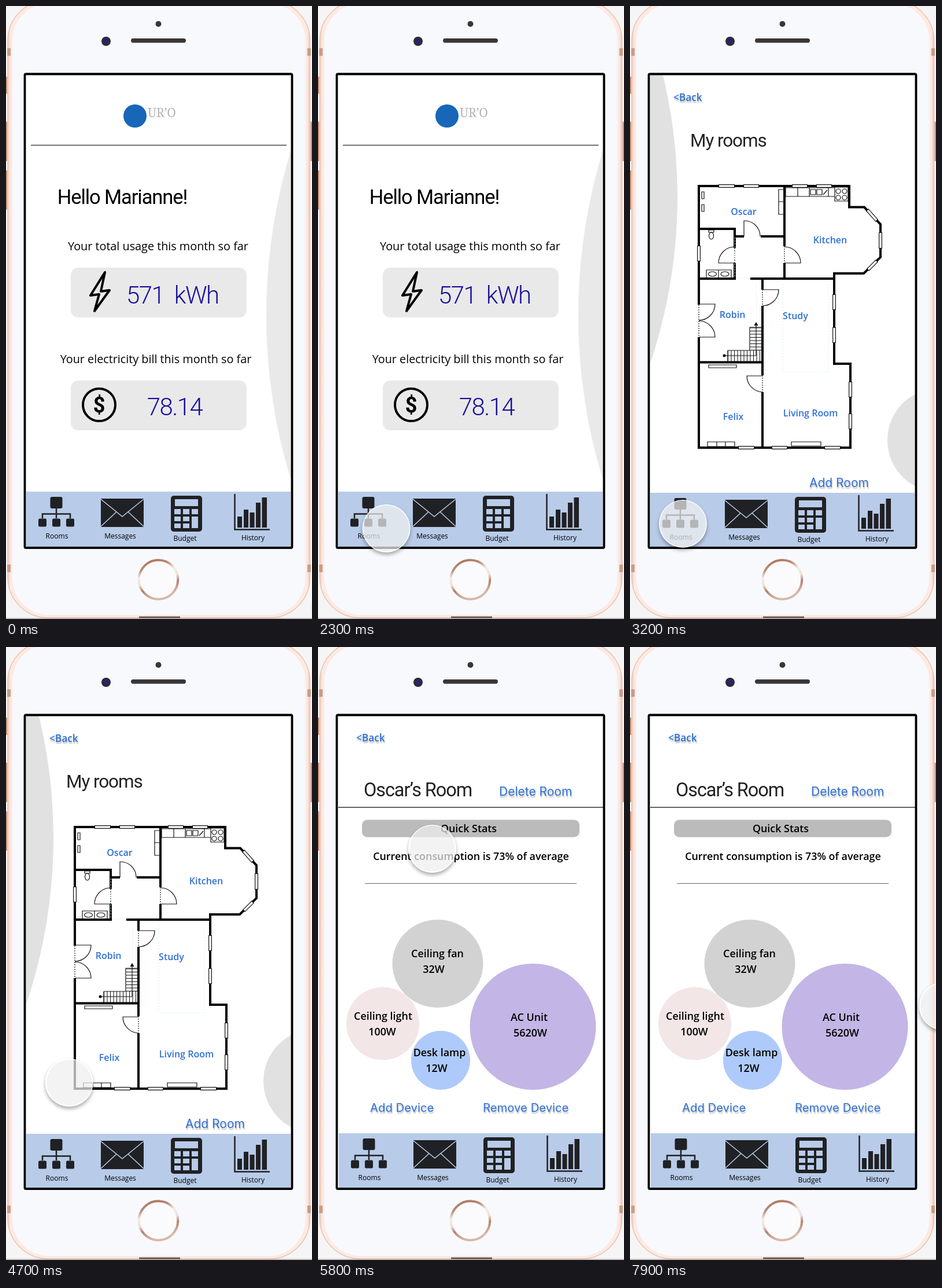
Write an HTML page that moves like this. It is 529 px wide and 1059 px high and loops after 8 s.

```html
<!DOCTYPE html>
<html lang="en">
<head>
<meta charset="utf-8">
<title>Energy app walkthrough</title>
<style>
  html, body { margin: 0; width: 100%; height: 100%; overflow: hidden; background: #f6f5f5; }
  svg { display: block; }
  text { font-family: "Open Sans", sans-serif; white-space: pre; }
  .mid { text-anchor: middle; }
  .title { font-family: Roboto, sans-serif; letter-spacing: -1.1px; fill: #222; }
  .caption { font-size: 19.8px; }
  .value { font: 300 42px Roboto, sans-serif; letter-spacing: -1.5px; fill: #1a0f9c; }
  .link { font: 21px Inter, sans-serif; fill: #2f70d8; text-shadow: 1px 3px 2px #0004; }
  .small { font-size: 20.3px; }
  .back { font-family: "Open Sans", sans-serif; font-size: 17.3px; font-weight: 600; }
  .label { font-size: 16px; font-weight: 600; fill: #2f70d8; text-anchor: middle; }
  .stat { font-size: 17.9px; font-weight: 600; text-anchor: middle; }
  .nav text { font-size: 12px; text-anchor: middle; }
  .thin { fill: none; stroke: #111; stroke-width: 1.2; }
  .window { fill: none; stroke: #111; stroke-width: 6; }
  .pane { fill: none; stroke: #fff; stroke-width: 3.6; }
  #touch {
    position: absolute; left: -41.5px; top: -41.5px; width: 83px; height: 83px;
    box-sizing: border-box; border: 2px solid #fffd; border-radius: 50%;
    background: #efefefb8 padding-box; box-shadow: 0 4px 6px #0005;
  }
</style>
</head>
<body>
<svg width="529" height="1059" viewBox="0 0 529 1059">
  <defs>
    <linearGradient id="rim">
      <stop stop-color="#eec8b8"/><stop offset=".009" stop-color="#fdeae2"/>
      <stop offset=".991" stop-color="#fdeae2"/><stop offset="1" stop-color="#eec8b8"/>
    </linearGradient>
    <linearGradient id="ring" x2=".3" y2="1">
      <stop stop-color="#a56d54"/><stop offset=".25" stop-color="#b98a76"/>
      <stop offset=".42" stop-color="#f6ebe5"/><stop offset=".6" stop-color="#f1e0d7"/>
      <stop offset=".75" stop-color="#b5826b"/><stop offset="1" stop-color="#d9b7a7"/>
    </linearGradient>
    <clipPath id="screen"><path d="M35 119H493V934H35Z"/></clipPath>
    <g id="nav" class="nav">
      <path fill="#b8cbe8" d="M35 839H492V936H35Z"/>
      <g fill="#202124">
        <rect x="76.5" y="848" width="21" height="20" rx="3"/>
        <rect x="56" y="885.5" width="14" height="14" rx="2.5"/>
        <rect x="80" y="885.5" width="14" height="14" rx="2.5"/>
        <rect x="104" y="885.5" width="14" height="14" rx="2.5"/>
        <path d="M164 851H238V900H164Z"/>
        <rect x="285" y="846" width="54" height="62" rx="5"/>
        <path d="M400 882h8v19h-8zM411 870h8v31h-8zM421.5 875h8v26h-8zM432 858h8v43h-8zM442.500 849h8.500v52h-8.500z"/>
      </g>
      <path fill="none" stroke="#202124" stroke-width="2.5" d="M87 868V885M63 885V877.5H111V885M395.500 843V904.500H456"/>
      <path fill="none" stroke="#b8cbe8" stroke-width="1.6" d="M164 852 201 882 238 852M164 899 191 874M238 899 211 874"/>
      <path fill="#b8cbe8" d="M292 852h40v12h-40zM291 869h11v9h-11zM306 869h11v9h-11zM321 869h11v9h-11zM291 882h11v8h-11zM306 882h11v8h-11zM291 894h11v8h-11zM306 894h11v8h-11zM321 882h11v20h-11z"/>
      <text x="88" y="920">Rooms</text>
      <text x="197.5" y="920">Messages</text>
      <text x="309.5" y="924">Budget</text>
      <text x="427" y="923">History</text>
    </g>
  </defs>

  <!-- phone -->
  <path fill="none" stroke="#c4927d" stroke-width="3" d="M.5 122V152M.5 200V268M.5 284V352M528 200V268"/>
  <rect x="3" y="-10" width="522.5" height="1067" rx="70" fill="url(#rim)" stroke="#e9c3b3" stroke-width="1.5"/>
  <rect x="11" y="-4" width="506.5" height="1056" rx="63" fill="#f8f9fd"/>
  <path fill="none" stroke="#c99c88" stroke-width="6" d="M5 73V86M524 73V86M5 965V978M524 965V978"/>
  <path fill="none" stroke="#8d8785" stroke-width="1.2" d="M0 1058H529"/>
  <path fill="none" stroke="#6d5a54" stroke-width="3" d="M230 1056H301"/>
  <circle cx="263.5" cy="31" r="5" fill="#3a3637"/>
  <rect x="216" y="56" width="95" height="7.5" rx="3.7" fill="#3a3637"/>
  <circle cx="173" cy="61" r="8" fill="#2b2b33"/>
  <circle cx="173" cy="61" r="4" fill="#22237c"/>
  <circle cx="263.5" cy="991" r="33.8" fill="#fbfbfd" stroke="url(#ring)" stroke-width="4"/>
  <rect x="32.5" y="117.5" width="462" height="818.5" rx="2" fill="#fff"/>

  <g clip-path="url(#screen)">
    <g id="home">
      <circle cx="1423" cy="534" r="973" fill="#e9e9e9"/>
      <circle cx="223" cy="190" r="20" fill="#1766b8"/>
      <text x="245" y="192" fill="#b3b3b3" style="font:21px 'Noto Serif',serif">UR’O</text>
      <path stroke="#444" stroke-width="1.6" d="M43 240.5H485"/>
      <text class="title mid" x="201" y="342" font-size="34.5" style="fill:#000">Hello Marianne!</text>
      <text class="caption mid" x="263" y="422">Your total usage this month so far</text>
      <rect x="112" y="452" width="304" height="86" rx="13" fill="#e9e9e9"/>
      <path fill="none" stroke="#000" stroke-width="4" stroke-linejoin="round" d="M171 460 146 500 161 498 153 527 179 491 164 493Z"/>
      <text class="value" x="208" y="514">571  kWh</text>
      <text class="caption mid" x="259" y="617">Your electricity bill this month so far</text>
      <rect x="112" y="647" width="304" height="86" rx="13" fill="#e9e9e9"/>
      <circle cx="161" cy="689" r="28" fill="none" stroke="#000" stroke-width="4"/>
      <text class="mid" x="161" y="702" style="font:700 36px Roboto,sans-serif">$</text>
      <text class="value mid" x="291.5" y="707">78.14</text>
      <use href="#nav"/>
    </g>

    <g id="rooms">
      <circle cx="-818" cy="330" r="900" fill="#e1e1e1"/>
      <circle cx="535" cy="750" r="90" fill="#e1e1e1"/>
      <text class="link back" x="75" y="164">&lt;Back</text>
      <text class="title" x="104" y="243" font-size="31.5">My rooms</text>
      <path fill="#fff" stroke="#000" stroke-width="4" d="M119 311H379V347.5H405L433 377V434L404 462H353V618H381V763H119Z"/>
      <path fill="none" stroke="#000" stroke-width="4" d="M267 311V415M267 444V471M119 385H181V418M181 444V471M181 398H197M226 398H267M119 471H183M208 471H353M229 471V490M229 518V638M229 667V763M119 615.5H229"/>
      <path fill="none" stroke="#fff" stroke-width="5" d="M119 516V572"/>
      <path class="thin" stroke-dasharray="2 2" d="M119 516V572M267 415V444M181 418V444M229 490V518M229 638V667"/>
      <path fill="none" stroke="#d4efec" stroke-dasharray="2 3" d="M264 480V632H343V480M219 480V548M181 400V470M183 470H208"/>
      <path class="window" d="M153 311H181M196 311H223M280 311H307M322 311H349M119 414V441M353 498V525M353 555V582M381 649V676M381 704V731M187 763H215M245 763H272M336 763H364M433 391V419M410 352 427 371M427 440 411 456"/>
      <path class="pane" d="M154 311H180M197 311H222M281 311H306M323 311H348M119 415V440M353 499V524M353 556V581M381 650V675M381 705V730M188 763H214M246 763H271M337 763H363M433 392V418M411 353 426 370M426 441 412 455"/>
      <path class="thin" d="M197 398V371A27 27 0 0 1 225 398M181 444H153A28 28 0 0 1 181 416M267 444H295A28 28 0 0 0 267 416M229 490H257A28 28 0 0 1 229 518M119 515H147A28 28 0 0 1 119 543M119 572H147A28 28 0 0 0 119 544M229 639H202A28 28 0 0 0 229 667"/>
      <path class="thin" d="M124 321h4v12h-4zM124 343h4v12h-4zM257 317h9v43h-9zM257 338h9M269 314h85v15h-85zM290 314v15M310 314v15M343 314v15M312 317h9v9h-9zM323 317h9v9h-9zM334 326l7-8M354 313h23v24h-23zM132 456h43v14h-43zM153 456v14M136 387h9v4h-9zM136 620h48v5h-48zM134 753h47v8h-47zM150 753v8M165 753v8M279 753h51v7h-51z"/>
      <g class="thin">
        <ellipse cx="140.5" cy="397" rx="4" ry="6"/>
        <ellipse cx="142.5" cy="463" rx="7" ry="4"/><ellipse cx="164" cy="463" rx="7" ry="4"/>
        <circle cx="360" cy="320" r="4"/><circle cx="371" cy="320" r="4"/>
        <circle cx="360" cy="331" r="4"/><circle cx="371" cy="331" r="4"/>
        <path d="M169 595H207V555H229M169 595V614"/>
      </g>
      <path fill="none" stroke="#111" stroke-width="19" stroke-dasharray="1 4.5" d="M169 604.5H229"/>
      <path fill="none" stroke="#111" stroke-width="21" stroke-dasharray="1 4.5" d="M218 595V555"/>
      <path class="thin" d="M163 604H218V549"/>
      <circle cx="163" cy="604" r="2.5"/>
      <path d="M214.5 552 218 546 221.5 552Z"/>
      <text class="label" x="196.5" y="361">Oscar</text>
      <text class="label" x="346" y="410">Kitchen</text>
      <text class="label" x="177" y="539">Robin</text>
      <text class="label" x="286" y="541">Study</text>
      <text class="label" x="178.5" y="715">Felix</text>
      <text class="label" x="312" y="709">Living Room</text>
      <text class="link" x="310" y="831">Add Room</text>
      <use href="#nav" y="2"/>
    </g>

    <g id="device">
      <text class="link back" x="66" y="163">&lt;Back</text>
      <text class="title" x="79" y="258" font-size="32.5">Oscar’s Room</text>
      <text class="link" x="313" y="257">Delete Room</text>
      <path stroke="#333" stroke-width="1.6" d="M34 277H493"/>
      <rect x="76" y="298.5" width="376" height="30" rx="9" fill="#bbb"/>
      <text class="stat" x="260.5" y="320">Quick Stats</text>
      <text class="stat" x="264.5" y="368">Current consumption is 73% of average</text>
      <path stroke="#666" d="M81 408.5H447"/>
      <ellipse cx="207" cy="547" rx="78.5" ry="76" fill="#d2d2d2"/>
      <circle cx="112" cy="650.5" r="63" fill="#f3e6e6"/>
      <circle cx="212" cy="714" r="51" fill="#aecafa"/>
      <circle cx="371.5" cy="656" r="109" fill="#c3b5e5"/>
      <text class="stat" x="206.5" y="536">Ceiling fan</text>
      <text class="stat" x="200" y="563">32W</text>
      <text class="stat" x="112.5" y="644">Ceiling light</text>
      <text class="stat" x="111" y="671">100W</text>
      <text class="stat" x="210" y="707">Desk lamp</text>
      <text class="stat" x="205" y="734">12W</text>
      <text class="stat" x="365" y="646">AC Unit</text>
      <text class="stat" x="367" y="673">5620W</text>
      <text class="link small" x="90" y="803">Add Device</text>
      <text class="link small" x="285" y="803">Remove Device</text>
      <use href="#nav" x="1" y="1"/>
    </g>
  </g>
  <rect x="32.5" y="117.5" width="462" height="818.5" rx="2" fill="none" stroke="#000" stroke-width="3.8"/>
</svg>
<div id="touch"></div>
<script>
const LOOP = 8000;
const $ = id => document.getElementById(id);

const screens = [["home", 0], ["rooms", 2800], ["device", 5600]];

// Each move follows a quadratic curve: start point, control point, end point.
const moves = [
  { at: 1750, ms: 725, path: [[573, 1037], [332, 966], [91, 894]] },
  { at: 4300, ms: 1000, path: [[91, 894], [119, 618], [197, 348]] },
  { at: 6750, ms: 1200, path: [[197, 348], [369, 484], [541, 620]] },
];

const ease = t => t < .5 ? 4 * t ** 3 : 1 - 4 * (1 - t) ** 3;

function touchPoint(time) {
  const move = moves.findLast(m => time >= m.at) || moves[0];
  const u = ease(Math.min(1, Math.max(0, (time - move.at) / move.ms)));
  const [a, b, c] = move.path;
  return [0, 1].map(i => (1 - u) ** 2 * a[i] + 2 * u * (1 - u) * b[i] + u * u * c[i]);
}

function draw(time) {
  const [current] = screens.findLast(([, start]) => time >= start);
  for (const [id] of screens) $(id).style.display = id === current ? "" : "none";
  const [x, y] = touchPoint(time);
  $("touch").style.transform = `translate(${x}px, ${y}px)`;
}

const begin = performance.now();
function tick() {
  draw((performance.now() - begin) % LOOP);
  requestAnimationFrame(tick);
}
tick();
</script>
</body>
</html>
```
